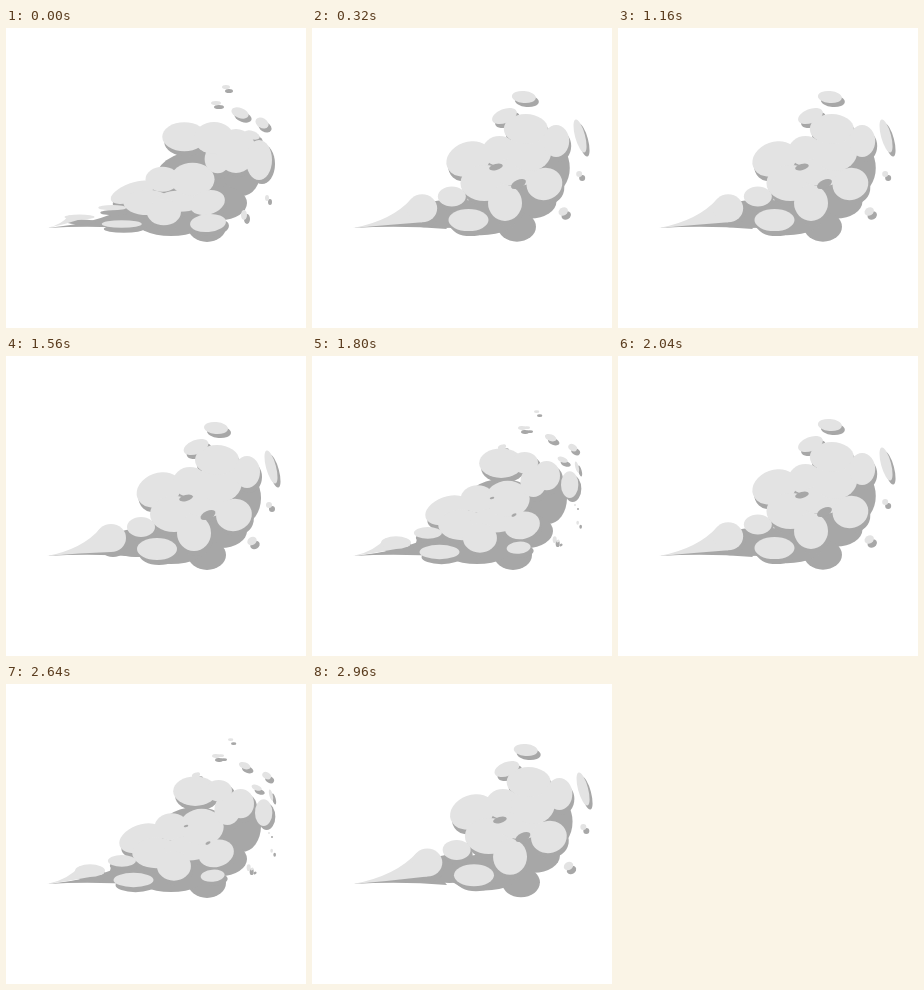
An HTML page with a canvas that plays this animation: 300 by 300 pixels, repeating every 3000 ms.

```html
<!DOCTYPE html>
<html lang="en">
<head>
<meta charset="utf-8">
<title>Smoke</title>
<style>
  html, body { margin: 0; width: 100%; height: 100%; overflow: hidden; background: #fff; }
  canvas { display: block; width: 300px; height: 300px; }
</style>
</head>
<body>
<canvas id="stage" width="300" height="300"></canvas>
<script>
const ctx = document.getElementById('stage').getContext('2d');
const LIGHT = '#e3e3e3', SHADE = '#a7a7a7';
const LOOP = 3000, TICK = 40, DRAWINGS = 9, SETTLED = 6;
const TIP = [41, 200];

// Blobs are x, y, rx, ry and an optional tilt in degrees.
// Puffs and chips are placed as they lie once the cloud has settled.
const tailPuff = [105, 182, 15, 14];
const puffs = [
  tailPuff, [135, 171, 14, 10], [151, 193, 20, 11],
  [153, 134, 23, 17, -20], [184, 126, 17, 15], [168, 158, 24, 18],
  [200, 147, 24, 14], [214, 126, 22, 20], [211, 104, 22, 15],
  [241, 116, 13, 16], [228, 159, 18, 16, -15], [188, 177, 17, 18]
];
const chips = [
  [210, 72, 12, 6, 5], [190, 91, 13, 7, -22], [265, 111, 5, 17, -15],
  [263, 149, 3, 3], [246, 185, 5, 4, -35]
];
const gaps = [[202, 159, 8, 4, -25], [180, 142, 7, 3, -15]];

// These belong to the burst and shrink away as the cloud settles.
const fading = [
  [208, 110, 20, 16], [230, 123, 20, 22], [253, 132, 13, 20], [202, 195, 18, 9, -5],
  [234, 85, 9, 5, 20], [256, 95, 7, 5, 30], [246, 107, 8, 4, 20],
  [220, 59, 4, 2], [210, 75, 5, 2], [238, 187, 3, 5], [261, 170, 2, 3]
];

// The underside stays almost in place.
const underside = [
  [190, 155, 42, 32], [236, 142, 19, 26], [215, 175, 26, 17],
  [201, 199, 19, 15], [165, 190, 38, 18], [130, 187, 26, 14]
];

// Carries a settled blob back towards the tip, lower and flatter near the tail.
function flow([x, y, rx, ry, tilt], back) {
  const dx = 26 + 10 * ((y - 145) / 50) ** 2;
  const dy = 28 * Math.exp(-(((y - 136) / 24) ** 2)) + (y - 104) * 0.08;
  const px = x - dx * back;
  const py = Math.min(y + dy * back, 196);
  const taper = Math.min(1, Math.max(0.25, 1 - (145 - px) / 60));
  const flat = (1 - (py - 100) / 300) * taper;
  return [px, py, rx, ry * (1 + (flat - 1) * back), tilt];
}

function drift([x, y, ...rest], amount) {
  const dx = 3 + (y - 60) * 0.06;
  const dy = -6 * Math.min(1, (205 - y) / 40);
  return [x + dx * amount, y + dy * amount, ...rest];
}

const scale = ([x, y, rx, ry, tilt], k) => [x, y, rx * k, ry * k, tilt];
const rise = ([x, y, ...rest], k) => [x + 14 * k, y - 10 * k, ...rest];

function blobs(list, color, dx = 0, dy = 0) {
  ctx.fillStyle = color;
  for (const [x, y, rx, ry, tilt = 0] of list) {
    ctx.beginPath();
    ctx.ellipse(x + dx, y + dy, rx, ry, tilt * Math.PI / 180, 0, Math.PI * 2);
    ctx.fill();
  }
}

function wedge(topX, topY, baseX, baseY, color) {
  const [x, y] = TIP;
  ctx.fillStyle = color;
  ctx.beginPath();
  ctx.moveTo(x, y);
  ctx.quadraticCurveTo((x + topX * 2) / 3, (y * 3 + topY) / 4, topX, topY);
  ctx.lineTo(baseX, baseY);
  ctx.quadraticCurveTo((x + baseX) / 2, y - 3, x, y);
  ctx.fill();
}

function draw(d) {
  const k = Math.min(1, d / SETTLED);
  const m = Math.max(0, (d - SETTLED) / 2);
  const body = puffs.map(p => drift(flow(p, 1 - k), m));
  const flakes = chips.map(p => drift(scale(p, k), m));
  const leftovers = fading.map(p => scale(rise(p, k), 1 - k));
  const base = underside.map(p => drift(p, m * 0.7));
  const [x, y, rx, ry] = body[0];

  ctx.fillStyle = '#fff';
  ctx.fillRect(0, 0, 300, 300);

  wedge(118, 180, 135, 201, SHADE);
  blobs(base, SHADE);
  blobs(body, SHADE, 2, 5);
  for (const list of [leftovers, flakes]) blobs(list, SHADE, 3, 4);

  wedge(x - rx * 0.7, y - ry * 0.7, x, y + ry, LIGHT);
  for (const list of [body, leftovers, flakes]) blobs(list, LIGHT);
  blobs(gaps.map(p => drift(scale(p, k), m)), SHADE);
}

function frame() {
  const n = Math.floor(performance.now() % LOOP / TICK);
  draw(Math.floor(n * 0.838 + 0.95) % DRAWINGS);
  requestAnimationFrame(frame);
}
frame();
</script>
</body>
</html>
```
